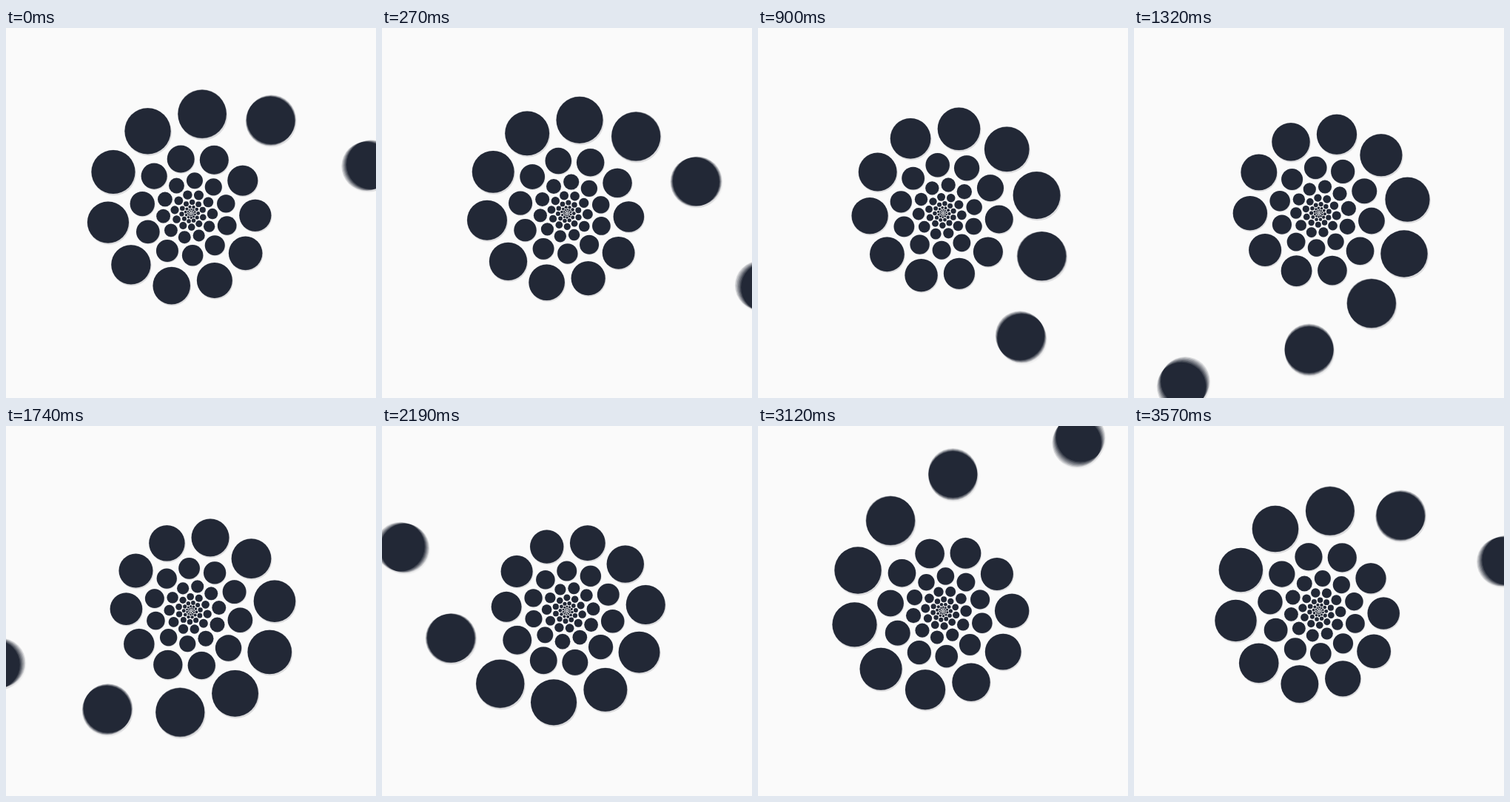
Recreate the animation shown at these times as an HTML page with a canvas. Size 500x500 px, loop 3600 ms.

```html
<!DOCTYPE html>
<html lang="en">
<head>
<meta charset="utf-8">
<title>Spiral of discs</title>
<style>
  html, body { margin: 0; width: 100%; height: 100%; overflow: hidden; background: #fafafa; }
  canvas { display: block; width: 500px; height: 500px; }
</style>
</head>
<body>
<canvas id="stage" width="500" height="500"></canvas>
<script>
const SIZE = 500, LOOP = 3600, STEP = 30;
const TURN = 2 * Math.PI;
const ANGLE = TURN * 2 / 21;            // angle between successive discs
const START = -117.86 * TURN / 360;
const DECAY = 0.0522, REACH = 125.2;    // logarithmic spiral
const RATIO = 0.249, MAX_R = 33.2;
const SAMPLES = 7, SHUTTER = 0.7;       // motion blur

const ctx = document.getElementById('stage').getContext('2d');
const layer = document.createElement('canvas');
layer.width = layer.height = SIZE;
const pen = layer.getContext('2d');

function disc(x, y, r, color) {
  pen.fillStyle = color;
  pen.beginPath();
  pen.arc(x, y, r, 0, TURN);
  pen.fill();
}

// Extra distance of discs that have not yet joined the spiral
function flight(u) {
  const d = Math.max(0, -u);
  return d ** 3 * (2.29 + 0.495 * d);
}

function drawSpiral(p) {
  pen.fillStyle = '#fafafa';
  pen.fillRect(0, 0, SIZE, SIZE);
  for (let n = Math.ceil(-4.5 - 10 * p); n + 10 * p < 105; n++) {
    const u = n + 10 * p;
    const base = REACH * Math.exp(-DECAY * u);
    const dist = base + flight(u);
    const a = START - ANGLE * n + p * ANGLE / 2;
    const x = SIZE / 2 + dist * Math.cos(a);
    const y = SIZE / 2 + dist * Math.sin(a);
    const r = Math.min(MAX_R, RATIO * base);
    disc(x + r * 0.04, y + r * 0.07, r, '#dcdcde');
    disc(x, y, r, '#222836');
  }
}

function render(ms) {
  const frame = Math.floor((ms % LOOP) / STEP + 0.001);
  for (let i = 0; i < SAMPLES; i++) {
    const shift = (i / (SAMPLES - 1) - 0.5) * SHUTTER;
    drawSpiral((frame + shift) * STEP / LOOP);
    ctx.globalAlpha = 1 / (i + 1);      // running average of samples
    ctx.drawImage(layer, 0, 0);
  }
}

const begin = performance.now();
function tick() {
  render(performance.now() - begin);
  requestAnimationFrame(tick);
}
tick();
</script>
</body>
</html>
```
